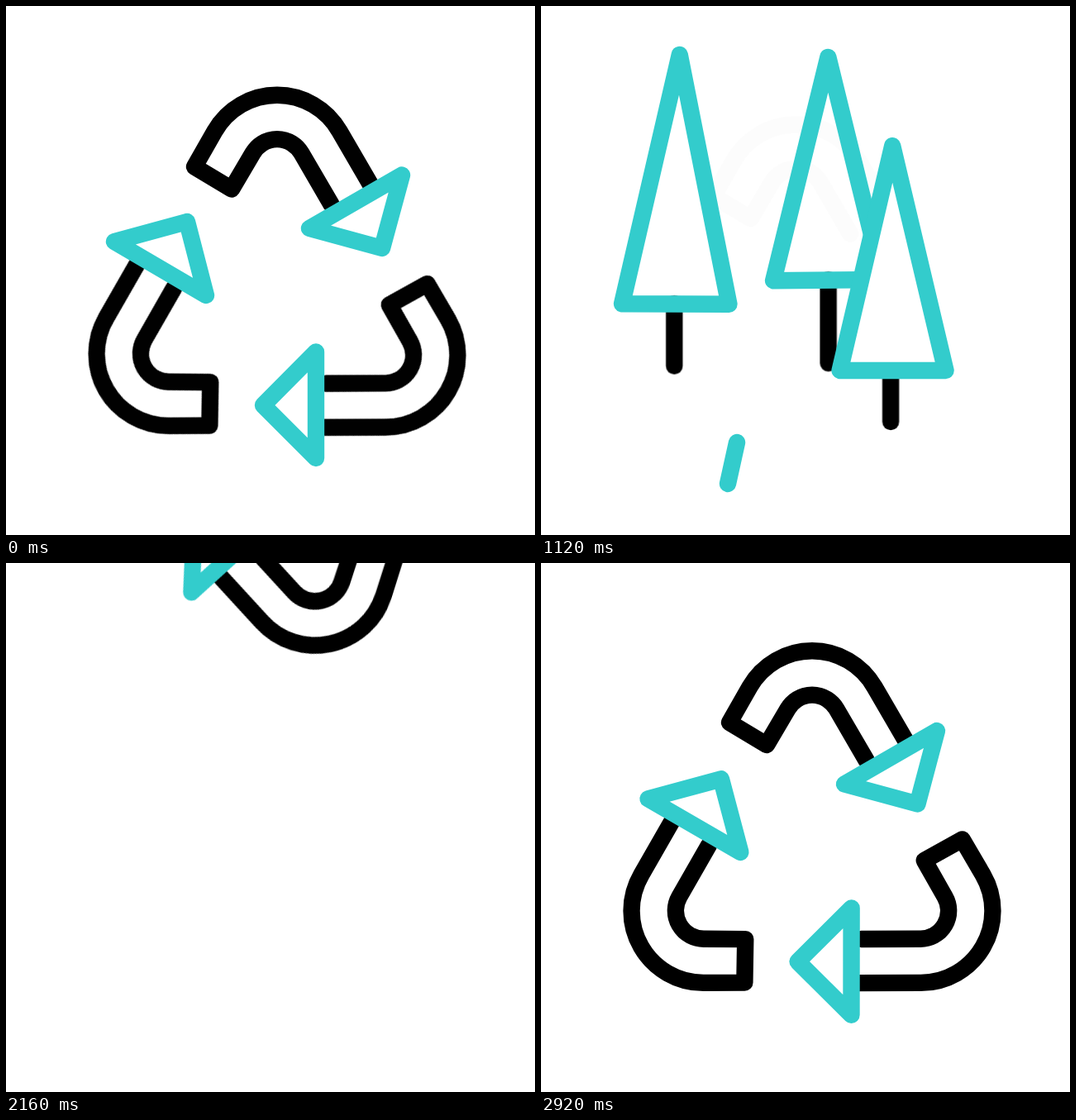
Animation, 640 px wide and 640 px high, one loop 3600 ms. Source, as an HTML page:

```html
<!DOCTYPE html>
<html lang="en">
<head>
<meta charset="utf-8">
<title>Recycling and trees</title>
<style>
  html, body { margin: 0; width: 100%; height: 100%; overflow: hidden; background: #fff; }
  svg { display: block; width: 100%; height: 100%; }
  path { fill: none; stroke-width: 20.4; stroke-linecap: round; stroke-linejoin: round; }
  .ink { stroke: #000; }
  .teal { stroke: #33cccc; }

  .scene, .arm, .follow, .tree, .symbol {
    animation: 3.6s cubic-bezier(.333, 0, .667, 1) infinite;
  }
  .scene { animation-name: scene; }
  .arm { animation-name: fade; --rest: 0; }
  .follow { animation-name: follow; }
  .symbol { animation-name: drop; transform-origin: 320px 325px; }
  .left { animation-name: left; }
  .middle { animation-name: middle; }
  .right { animation-name: right; fill: #fff; }

  /* Trunks and blades draw themselves from the root, each after its own delay. */
  .grow {
    stroke-dasharray: 1 2;
    animation: grow 3.6s cubic-bezier(.333, 0, .667, 1) var(--at) infinite both;
  }

  @keyframes scene {
    0%, 54% { opacity: 1; }
    60%, 100% { opacity: 0; }
  }
  @keyframes fade {
    0% { opacity: 1; }
    12%, 100% { opacity: var(--rest); }
  }
  @keyframes follow {
    0%, 12% { transform: translate(0, 0); }
    55%, 100% { transform: translate(var(--x), var(--y)); }
  }
  @keyframes grow {
    0% { stroke-dashoffset: 1.01; visibility: hidden; }
    .1%, 49% { visibility: visible; }
    9.4%, 100% { stroke-dashoffset: 0; }
    49.1%, 100% { visibility: hidden; }
  }
  @keyframes drop {
    0%, 51.67% { transform: translate(0, -571px) rotate(-90deg); }
    81.11%, 100% { transform: translate(0, 0) rotate(0deg); }
  }
  @keyframes left {
    0% { d: path("M219 261 L131 285 L242 350 Z"); }
    12% { d: path("M180.5 44 L111 345 L240 345.5 Z"); }
    55%, 100% { d: path("M150 80 L80 381.5 L210 382 Z"); }
  }
  @keyframes middle {
    0% { d: path("M479 204.5 L367 269 L455 293 Z"); }
    12% { d: path("M367 51 L300.5 297 L433 295.5 Z"); }
    55%, 100% { d: path("M320 77 L254 381.5 L386 380.5 Z"); }
  }
  @keyframes right {
    0% { d: path("M375 418.5 L311 483 L375 547 Z"); }
    12% { d: path("M375 234 L311 483 L439 483 Z"); }
    55%, 100% { d: path("M495 79 L432 382.5 L560 382.5 Z"); }
  }
</style>
</head>
<body>
<svg viewBox="0 0 640 640">
  <defs>
    <path id="arm" class="ink" d="M441 214.5 L403.5 150 A87 87 0 0 0 252.5 150 L228 193 L273 220 L298.6 176.5 A34 34 0 0 1 357.4 176.5 L393.5 238.5"/>
    <g id="arrow">
      <use href="#arm"/>
      <path class="teal" d="M479 203 L367 267.5 L455.5 291.5 Z"/>
    </g>
  </defs>

  <g class="scene">
    <g class="follow" style="--x:-46.5px;--y:85px">
      <g class="arm" style="--rest:.012"><use href="#arm" y="1.5"/></g>
    </g>
    <g class="arm"><use href="#arm" transform="rotate(-120 328 345)"/></g>
    <g class="arm"><use href="#arm" transform="translate(0 1.7) rotate(120 328 345)"/></g>

    <g class="follow" style="--x:-30.5px;--y:37px">
      <path class="ink grow" style="--at:431ms" pathLength="1" d="M174 345 V420"/>
    </g>
    <path class="teal tree left" d="M219 261 L131 285 L242 350 Z"/>

    <g class="follow" style="--x:-47px;--y:85px">
      <path class="ink grow" style="--at:600ms" pathLength="1" d="M367.3 296 V396.5"/>
    </g>
    <path class="teal tree middle" d="M479 204.5 L367 269 L455 293 Z"/>

    <g class="follow" style="--x:121px;--y:-100.5px">
      <path class="ink grow" style="--at:530ms" pathLength="1" d="M372.5 483 V545"/>
    </g>
    <path class="teal tree right" d="M375 418.5 L311 483 L375 547 Z"/>

    <path class="teal grow" style="--at:896ms" pathLength="1" d="M226 578 L241 510"/>
    <path class="teal grow" style="--at:1236ms" pathLength="1" d="M226 578 C227 545 214 522 185 520"/>
    <path class="teal grow" style="--at:1576ms" pathLength="1" d="M226 578 Q240 565 260 558"/>
    <path class="teal grow" style="--at:1730ms" pathLength="1" d="M410 582 C406 560 399 538 375 519"/>
  </g>

  <g class="symbol">
    <use href="#arrow"/>
    <use href="#arrow" transform="rotate(-120 328 345)"/>
    <use href="#arrow" transform="rotate(120 328 345)"/>
  </g>
</svg>
</body>
</html>
```
